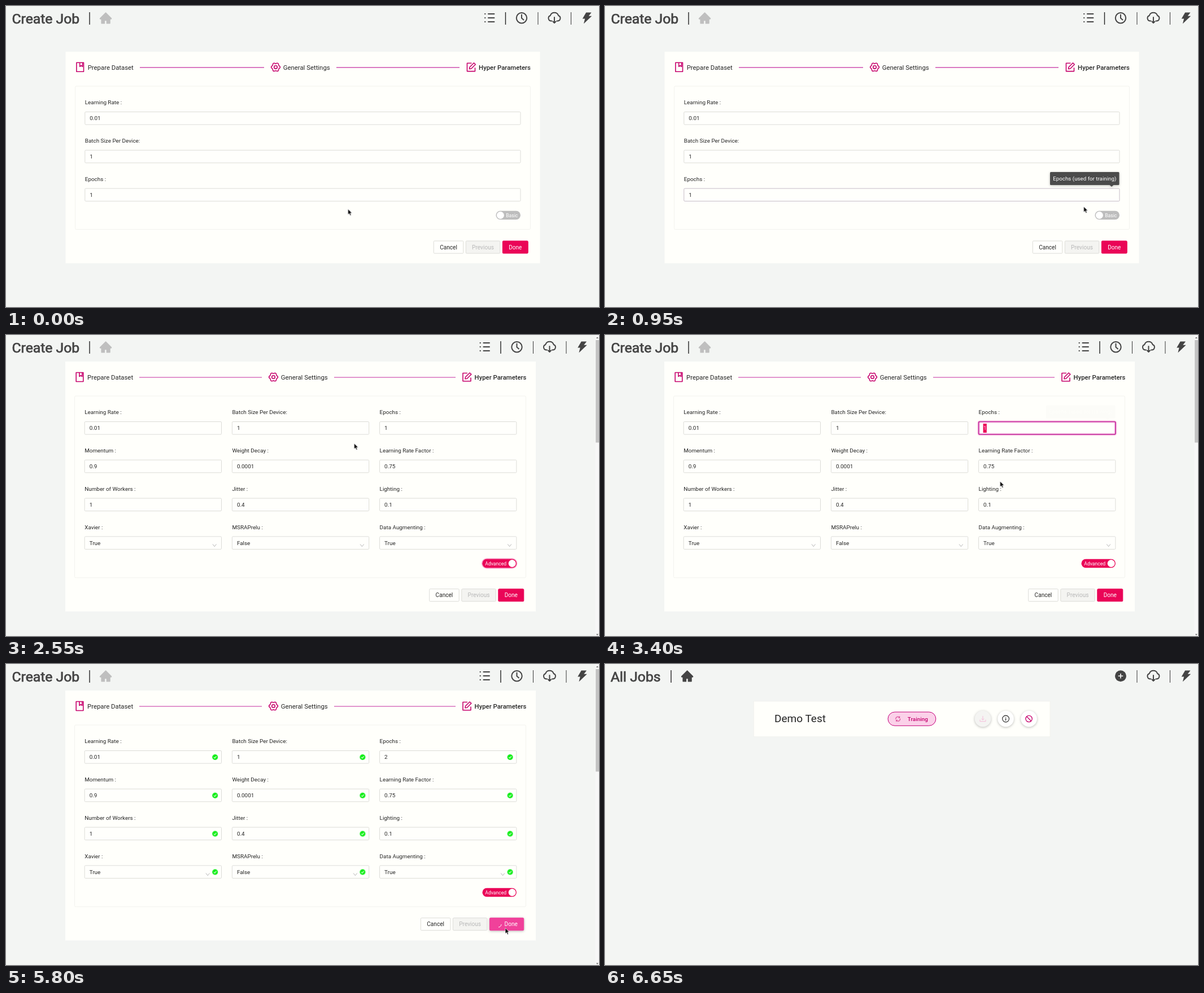
Recreate the animation shown at these times as an HTML page. Size 1050 by 533 pixels, loop 6.7 s.

```html
<!DOCTYPE html>
<html lang="en">
<head>
<meta charset="utf-8">
<title>Create Job</title>
<style>
  html, body { margin: 0; width: 100%; height: 100%; overflow: hidden; background: #f3f5f3; }
  svg { display: block; width: 1050px; height: 533px; font-family: Roboto, sans-serif; font-size: 9.9px; fill: #262626; }
  .title { font-size: 24.7px; fill: #444; stroke: #444; stroke-width: .75px; }
  .step { font-size: 11.35px; }
  .bold { font-weight: 500; }
  .mid { text-anchor: middle; }
  .small { font-size: 8.6px; fill: #fff; }
  .card { fill: #fffffb; }
  .panel { fill: none; stroke: #f3f3ee; }
  .box { fill: #fffffc; stroke: #dcdcd8; }
  .line { fill: none; stroke: #444; stroke-width: 2; stroke-linecap: round; stroke-linejoin: round; }
  .brand { fill: none; stroke: #c6006c; stroke-width: 1.6; stroke-linejoin: round; }
  .sep { stroke: #222; stroke-width: 1.4; }
  .thin { stroke-width: .9; }
  .rule { stroke: #c32c9f; stroke-width: 1.2; }
  .chevron { fill: none; stroke: #b5b5b5; stroke-width: 1; }
  .check, .spin, .tip { transform-box: fill-box; transform-origin: center; }
  .spin { animation: spin 957.143ms linear infinite; }
  .shadow { filter: drop-shadow(0 1px 2px #0004); }
  @keyframes spin { to { transform: rotate(360deg); } }
</style>
</head>
<body>
<svg id="stage" viewBox="0 0 1050 533"></svg>
<script>
const LOOP = 6700, PITCH = 67.8, PINK = '#ea0557';
const rules = [];

// Timed keyframes: steps are [milliseconds, value] pairs.
function animate(selector, property, steps, easing = 'step-end') {
  const name = 'track' + rules.length;
  const frames = [...steps, [LOOP, steps.at(-1)[1]]]
    .map(([ms, value]) => `${(ms / LOOP * 100).toFixed(3)}%{${property}:${value}}`).join('');
  rules.push(`@keyframes ${name}{${frames}}${selector}{animation:${name} ${LOOP}ms ${easing} infinite}`);
}
const show = (selector, from, to) => animate(selector, 'opacity', [[0, 0], [from, 1], [to, 0]]);

const group = (cls, body, x = 0, y = 0) => `<g class="${cls}"><g transform="translate(${x} ${y})">${body}</g></g>`;
const text = (x, y, value, cls = '', extra = '') => `<text x="${x}" y="${y}" class="${cls}" ${extra}>${value}</text>`;
const rect = (x, y, w, h, cls = '', extra = '') => `<rect x="${x}" y="${y}" width="${w}" height="${h}" class="${cls}" ${extra}/>`;
const path = (d, cls = '', extra = '') => `<path d="${d}" class="${cls}" ${extra}/>`;
const circle = (x, y, r, cls = '', extra = '') => `<circle cx="${x}" cy="${y}" r="${r}" class="${cls}" ${extra}/>`;
const sep = (x, cls = '') => path(`M${x} 11V33`, 'sep ' + cls);

const home = (x, color) => path('M946 505L535 93a32 32 0 0 0-45 0L77 505c-42 42-12 109 46 109h43V908q0 32 32 32H448V716h112v224h266q32 0 32-32V614h43c58 0 88-67 45-109z',
  '', `fill="${color}" transform="translate(${x - 12} 9.3) scale(.0236)"`);
const bolt = path('M848 359H628L826 109q6-13-6-13H436L170 548q-3 12 7 12h174L262 917q3 15 13 8L853 373q5-10-5-14z',
  '', 'fill="#444" transform="translate(1016.9 9.2) scale(.0236)"');
const cloud = group('', path('M-4.5 5.5H-6A4.9 4.9 0 0 1-7.2-4A7.6 7.6 0 0 1 7.2-4A4.9 4.9 0 0 1 6 5.5H4.5M0-1V8.5M-2.5 6.5L0 9L2.5 6.5', 'line'), 971, 21);
const tools = sep(942, 'thin') + cloud + sep(1000.5, 'thin') + bolt;

const gear = 'M' + Array.from({ length: 60 }, (_, i) => {
  const a = i * Math.PI / 30, r = 7.1 + .8 * Math.cos(6 * a + Math.PI);
  return `${(r * Math.sin(a)).toFixed(2)} ${(r * Math.cos(a)).toFixed(2)}`;
}).join('L') + 'Z';

function header(shift) {
  return text(10.5, 31, 'Create Job', 'title') + sep(148) + home(176.5, '#bfbfbf') + group('',
    path('M848 14h.5M848 21h.5M848 28h.5M854 14H864.5M854 21H864.5M854 28H864.5', 'line') + sep(884.5) +
    circle(913, 21.2, 9.2, 'line') + path('M913 15.5V21.5L916.5 24.5', 'line') + tools, shift);
}

// Positions: book icon, first rule, gear, second rule, edit icon.
function stepper(y, [book, rule1, end1, cog, rule2, end2, edit]) {
  const mark = (x, d) => group('', path(d, 'brand'), x, y);
  return mark(book, 'M-6.3-8H6.3V8H-6.3ZM-.5-8V-1L2-2.8L4.3-1V-8') +
    text(book + 13.5, y + 4.2, 'Prepare Dataset', 'step') +
    path(`M${rule1} ${y + .5}H${end1}`, 'rule') +
    mark(cog, gear + 'M2.8 0A2.8 2.8 0 1 1-2.8 0A2.8 2.8 0 1 1 2.8 0Z') +
    text(cog + 13.3, y + 4.2, 'General Settings', 'step') +
    path(`M${rule2} ${y + .5}H${end2}`, 'rule') +
    mark(edit, 'M1-7H-7V7.3H7V1M-3 3.2L-2.5 0L5-7.5L7.8-4.8L.3 2.7Z') +
    text(edit + 13.6, y + 4.2, 'Hyper Parameters', 'step bold');
}

function field(x, y, w, [label, value], cls = '') {
  return text(x, y - 13.2, label) + rect(x, y, w, 22.5, 'box ' + cls, 'rx="1.5"') +
    (value ? text(x + 8.5, y + 14.8, value) : '');
}

function button(x, y, w, label, kind = 'plain', textX = x + w / 2) {
  const [fill, stroke, ink] = {
    plain: ['#fffffc', '#dcdcd8', '#262626'], off: ['#f4f4f1', '#dcdcd8', '#b8b8b8'],
    main: [PINK, PINK, '#fff'], busy: ['#f0419a', '#f0419a', '#fff']
  }[kind];
  return rect(x, y, w, 22, kind === 'busy' ? 'shadow' : '', `rx="1.5" fill="${fill}" stroke="${stroke}"`) +
    text(textX, y + 14.7, label, 'mid', `fill="${ink}" style="font-size:10.1px"`);
}

const check = (x, y, cls) => group('', `<g class="check ${cls}">` + circle(0, 0, 5, '', 'fill="#12ee18"') +
  path('M-2.2 .1L-.6 1.8L2.3-1.6', '', 'fill="none" stroke="#fff" stroke-width="1.1"') + '</g>', x, y);
const tooltip = (x, y, cls) => `<g class="tip ${cls}">` + group('shadow',
  rect(0, 0, 122.5, 23, '', 'rx="1.5" fill="#4b4b4b"') + path('M105.5 23L109 26L112.5 23Z', '', 'fill="#4b4b4b"') +
  text(61.3, 14.9, 'Epochs (used for training)', 'mid', 'fill="#fff" style="font-size:9.75px"'), x, y) + '</g>';

const params = [
  ['Learning Rate :', '0.01'], ['Batch Size Per Device:', '1'], ['Epochs :', ''],
  ['Momentum :', '0.9'], ['Weight Decay :', '0.0001'], ['Learning Rate Factor :', '0.75'],
  ['Number of Workers :', '1'], ['Jitter :', '0.4'], ['Lighting :', '0.1'],
  ['Xavier :', 'True'], ['MSRAPrelu :', 'False'], ['Data Augmenting :', 'True']
];

const basic = header(0) + rect(105.5, 81, 840, 374.5, 'card') +
  stepper(108.3, [131.2, 237, 457, 477.5, 585, 803, 823.5]) +
  rect(122.5, 142, 806, 253.5, 'panel', 'rx="2"') +
  params.slice(0, 3).map((p, i) => field(139.8, 187.5 + i * PITCH, 771.2, [p[0], p[1] || '1'], i === 2 ? 'hovered' : '')).join('') +
  rect(867.5, 362.8, 43.5, 15.4, '', 'rx="7.7" fill="#bdbdbd"') + circle(875.4, 370.5, 6.5, '', 'fill="#fff"') +
  text(885.2, 373.6, 'Basic', 'small') +
  button(757.3, 416, 52.5, 'Cancel') + button(814.3, 416, 60.5, 'Previous', 'off') + button(879.3, 416, 45, 'Done', 'main') +
  tooltip(788, 294, 'hint');

const cell = i => [139.2 + (i % 3) * 261.2, 153.5 + Math.floor(i / 3) * PITCH];
const advancedFields = params.map((p, i) => {
  const [x, y] = cell(i);
  const arrow = i > 8 ? path(`M${x + 226.7} ${y + 13.5}l3.3 4.2l3.3-4.2`, 'chevron') : '';
  return field(x, y, 242.3, p) + (arrow && `<g class="arrow">${arrow}</g>`) +
    check(x + 231, y + 11.5, i === 2 ? 'first' : 'rest');
}).join('');

const advanced = header(-8.5) + rect(105, 47, 833, 442.5, 'card') +
  stepper(74.5, [130.5, 236, 453, 473.5, 581, 796, 816]) +
  rect(121.5, 108, 799, 321.8, 'panel', 'rx="2"') + advancedFields +
  rect(661.6, 153.5, 242.3, 22.5, 'focus', `rx="1.5" fill="none" stroke="#c32c9f" stroke-width="1.6" style="filter:drop-shadow(0 0 1px #e83ba8)"`) +
  rect(669.6, 157, 6.2, 16, 'selected', `fill="${PINK}"`) +
  text(670.1, 168.3, '1', 'one') + text(670.1, 168.3, '1', 'selected', 'fill="#ffd8e6"') +
  text(670.1, 168.3, '2', 'two') + rect(675.6, 159, .9, 12, 'caret') +
  rect(843.5, 396.8, 60.5, 15.4, 'glow', 'rx="7.7" fill="none" stroke="#f7a5cb" stroke-width="3"') +
  rect(843.5, 396.8, 60.5, 15.4, 'switch', `rx="7.7" fill="${PINK}"`) + circle(896.2, 404.5, 6.5, 'knob', 'fill="#fff"') +
  text(848.3, 407.5, 'Advanced', 'small') +
  group('idle', button(749.7, 449.7, 52.5, 'Cancel') + button(806.8, 449.7, 60.5, 'Previous', 'off') +
    button(871.8, 449.7, 45, 'Done', 'main')) +
  group('busy', button(734.4, 449.7, 52.5, 'Cancel') + button(791.4, 449.7, 60.5, 'Previous', 'off') +
    button(856.4, 449.7, 60.3, 'Done', 'busy', 894.2) +
    group('', `<g class="spin" style="transform-box:view-box;transform-origin:0 0">` +
      path('M5 0A5 5 0 0 1 0 5', '', 'fill="none" stroke="#fff" stroke-width="1" transform="rotate(-22)"') + '</g>', 872, 461)) +
  tooltip(781, 124.5, 'hint2') +
  rect(1043.3, 0, 6.7, 533, '', 'fill="#f7f7f7"') + rect(1044.2, 9, 5.8, 181.5, '', 'fill="#c3c3c3"') +
  path('M1045 6L1047 3.5L1049 6ZM1045 529.5L1047 532L1049 529.5Z', '', 'fill="#666"');

const round = (x, fill, body) => circle(x, 97, 14.3, 'shadow', `fill="${fill}"`) + group('', body, x, 97);
const jobs = text(10, 31, 'All Jobs', 'title') + sep(117) + home(145.5, '#444') +
  circle(913, 21.2, 10, '', 'fill="#444"') + path('M908.8 21.2H917.2M913 17V25.4', '', 'stroke="#fff" stroke-width="1.6"') + tools +
  rect(263.5, 66, 524.5, 62.8, 'card', 'stroke="#efefec" stroke-width=".7"') +
  text(300, 103.3, 'Demo Test', '', 'style="font-size:19px"') +
  rect(501, 85, 84.8, 24.3, '', 'rx="12.1" fill="#fbd1e9" stroke="#c4007a"') +
  group('', `<g class="spin">` + path('M-3.9-.6A3.9 3.9 0 0 1 3.5-1.8M3.9 .6A3.9 3.9 0 0 1-3.5 1.8M3.8-3.6V-1.5H1.7M-3.8 3.6V1.5H-1.7',
    'brand', 'style="stroke-width:.9"') + '</g>', 518.7, 97.3) +
  text(535.8, 100.9, 'Training', 'bold', 'fill="#c4006e"') +
  round(669, '#f4f4f2', path('M0-5V2M-2.4-.2L0 2.2L2.4-.2M-5 1.6V4.7H5V1.6', '', 'fill="none" stroke="#f6bcd9" stroke-width="1"')) +
  round(709.6, '#fff', circle(0, 0, 5.9, '', 'fill="none" stroke="#222" stroke-width="1.1"') +
    path('M0-1V3.2M0-3.1V-2', '', 'stroke="#222" stroke-width="1.2"')) +
  round(750.6, '#fff', circle(0, 0, 5.7, 'brand', 'style="stroke-width:1.3"') + path('M-4-4L4 4', 'brand', 'style="stroke-width:1.3"'));

const pointer = path('M0 0V10L2.3 7.9L3.9 11.6L5.7 10.8L4.1 7.2H7.2Z', 'cursor', 'fill="#0a0a0a" stroke="#fff" stroke-width=".7"');
document.getElementById('stage').innerHTML =
  group('basic', basic) + group('advanced', advanced) + group('jobs', jobs) + pointer;

show('.basic', 0, 1600);
show('.advanced', 1600, 5980);
show('.jobs', 5980, LOOP);

animate('.hovered', 'stroke', [[0, '#dcdcd8'], [430, '#dcdcd8'], [600, '#c32c9f'], [880, '#c32c9f'], [950, '#c6bcc8']], 'linear');
animate('.hint', 'opacity', [[0, 0], [580, 0], [720, 1], [1000, 1], [1150, 0]], 'linear');
animate('.hint2', 'opacity', [[0, 0], [2680, 0], [2800, 1], [3270, 1], [3390, .012], [3700, .012], [3710, 0]], 'linear');

animate('.switch', 'fill', [[0, '#bdbdbd'], [1600, '#bdbdbd'], [1800, PINK]], 'linear');
animate('.knob', 'transform', [[0, 'translateX(-45px)'], [1600, 'translateX(-45px)'], [1800, 'none']], 'ease-in-out');
show('.glow', 1650, 3100);

show('.focus', 3100, 5450);
show('.selected', 3200, 4100);
show('.one', 0, 3200);
show('.two', 4100, LOOP);
animate('.caret', 'opacity', [[0, 0], [4100, 1], [4600, 0], [5100, 1], [5450, 0]]);

const pop = start => [[0, 'scale(0)'], [start, 'scale(0)'], [start + 200, 'scale(1.1)'], [start + 300, 'none']];
animate('.first', 'transform', pop(4050), 'linear');
animate('.rest', 'transform', pop(5450), 'linear');
animate('.arrow', 'transform', [[0, 'none'], [5450, 'translateX(-12px)']]);
show('.idle', 0, 5500);
show('.busy', 5500, LOOP);

animate('.cursor', 'transform', [
  [0, 605.5, 359.5], [300, 605.5, 359.5], [500, 690, 342], [750, 812, 336], [900, 843, 347], [950, 847.5, 355],
  [1000, 853, 359], [1200, 884, 368], [2150, 884, 368], [2300, 600, 418], [2400, 340, 350], [2470, 420, 240],
  [2550, 615.5, 192], [2700, 755, 166], [2800, 745, 165], [2850, 735, 165], [3100, 676, 165], [3200, 676, 167],
  [3400, 699.5, 259], [3700, 699.5, 259], [4000, 850, 400], [4250, 963, 458], [4350, 956, 462], [4400, 956, 462], [4450, 950, 465],
  [4600, 950, 465], [4700, 930, 473], [4800, 904.5, 468], [5000, 884, 467.5], [5900, 884, 467.5],
  [6100, 570, 485], [6350, -14, 531]
].map(([ms, x, y]) => [ms, `translate(${x}px,${y}px)`]), 'linear');

document.head.appendChild(document.createElement('style')).textContent = rules.join('\n');
</script>
</body>
</html>
```
